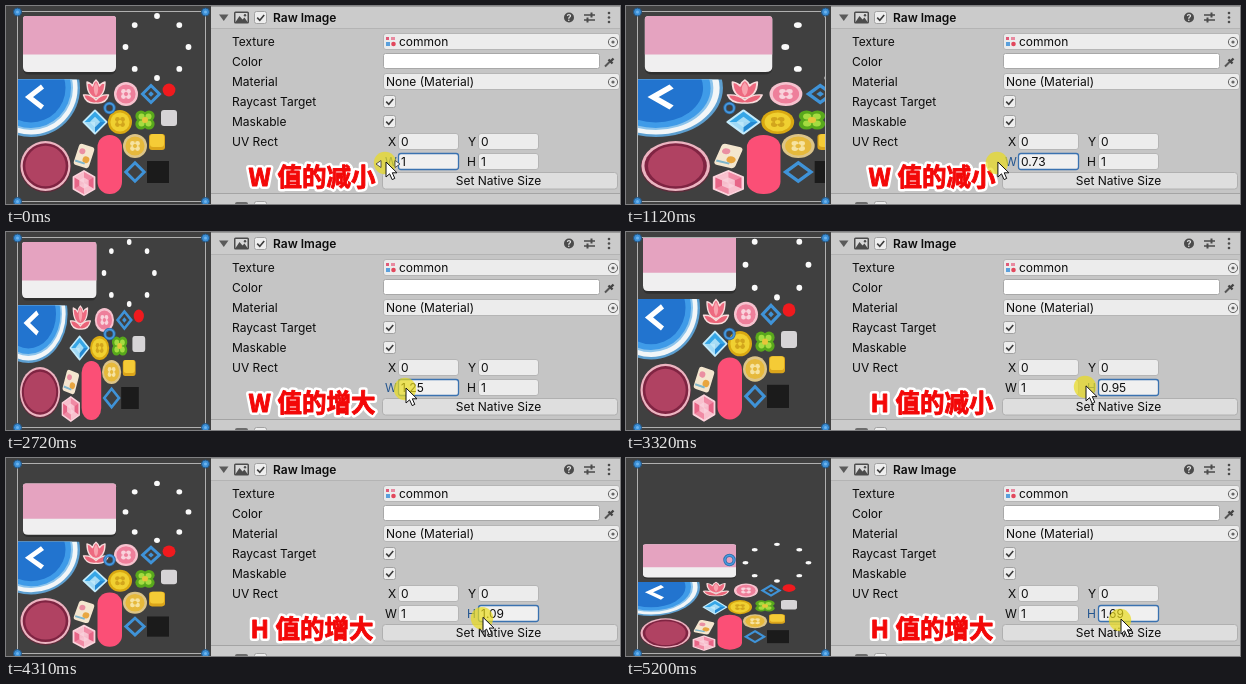
An HTML page that plays this animation: 614x198 px, repeating every 5.3 s.

```html
<!DOCTYPE html>
<html lang="zh">
<head>
<meta charset="utf-8">
<title>UV Rect</title>
<style>
html, body { margin: 0; width: 100%; height: 100%; overflow: hidden; background: #404040; }
svg { display: block; width: 614px; height: 198px; }
text { font: 12px Inter, "Open Sans", sans-serif; fill: #0c0c0c; white-space: pre; }
.title { font-weight: 600; }
.active { fill: #23558f; }
.box { fill: #ececec; stroke: #b5b5b5; }
.focus { fill: #f0f0f0; stroke: #3a72b0; stroke-width: 1.3; }
.caption {
  font: bold 24.5px "Noto Sans CJK SC", "Noto Sans CJK", "Noto Sans CJK JP", sans-serif;
  fill: #f30808; stroke: #f30808; stroke-width: .9px; stroke-linejoin: round;
  text-anchor: middle; word-spacing: 1px;
}
.outline { stroke: #fff; stroke-width: 6px; }
</style>
</head>
<body>
<svg id="stage" viewBox="0 0 614 198" xmlns="http://www.w3.org/2000/svg"></svg>
<script>
const stage = document.getElementById('stage');

const circle = (x, y, r, fill, extra = '') =>
  `<circle cx="${x}" cy="${y}" r="${r}" fill="${fill}" ${extra}/>`;
const rect = (x, y, w, h, fill, rx = 0, extra = '') =>
  `<rect x="${x}" y="${y}" width="${w}" height="${h}" rx="${rx}" fill="${fill}" ${extra}/>`;
const path = (d, fill, extra = '') => `<path d="${d}" fill="${fill}" ${extra}/>`;
const line = (d, color, width, extra = '') =>
  path(d, 'none', `stroke="${color}" stroke-width="${width}" ${extra}`);
const label = (x, y, str, extra = '') => `<text x="${x}" y="${y}" ${extra}>${str}</text>`;
const field = (x, y, w, id = '') =>
  `<rect class="box" id="${id}" x="${x + .5}" y="${y + .5}" width="${w - 1}" height="16" rx="2.5"/>`;

const check = (x, y) =>
  rect(x + .5, y + .5, 12, 12, '#eeeeee', 2, 'stroke="#a2a2a2"') +
  line(`M${x + 3.2} ${y + 6.6}l2.6 2.6l4.4 -5.2`, '#3c3c3c', 1.6);
const picker = y =>
  circle(607, y, 4.6, 'none', 'stroke="#666"') + circle(607, y, 1.6, '#666');
const diamond = (x, y, r) =>
  line(`M${x} ${y - r}L${x + r} ${y}L${x} ${y + r}L${x - r} ${y}Z`, '#3f93d8', 3);

function petals(x, y, n, spread, r, fill) {
  return Array.from({ length: n }, (_, i) => {
    const a = (i / n) * 2 * Math.PI + Math.PI / 4;
    return circle((x + spread * Math.cos(a)).toFixed(1), (y + spread * Math.sin(a)).toFixed(1), r, fill);
  }).join('');
}

function coin(x, y, edge, face, mark) {
  return circle(x, y, 12, edge) + circle(x, y, 9.6, face) +
    petals(x, y, 4, 3.6, 2.4, mark) + circle(x, y, 2, face);
}

function gem(x, y, r, sides, light, mid, dark) {
  const at = (i, k) => {
    const a = (i / sides) * 2 * Math.PI - Math.PI / 2;
    return `${(x + k * Math.cos(a)).toFixed(1)} ${(y + k * Math.sin(a)).toFixed(1)}`;
  };
  const ring = k => 'M' + Array.from({ length: sides }, (_, i) => at(i, k)).join('L') + 'Z';
  let out = path(ring(r), mid, `stroke="${light}" stroke-width="2" stroke-linejoin="round"`);
  for (let i = 0; i < sides; i++)
    out += path(`M${x} ${y}L${at(i, r - 1)}L${at(i + 1, r - 1)}Z`, [mid, dark, light][i % 3], 'opacity=".75"');
  return out + path(ring(r * .45), light, 'opacity=".8"');
}

function flower() {
  const edge = 'stroke="#f8dcdc" stroke-width="1.4" stroke-linejoin="round"';
  return path('M90 97q-10 1 -12.5 -8q7 -1 12.5 5q5.500 -6 12.500 -5q-2.500 9 -12.500 8Z', '#ea6478', edge) +
    path('M90 92q-9 -2 -9 -16q4 1 5.500 4q1 -4 3.500 -6q2.500 2 3.500 6q1.500 -3 5.500 -4q0 14 -9 16Z', '#ee6a80', edge) +
    path('M90 76q4.500 7 0 14q-4.500 -7 0 -14Z', '#f8a3ae');
}

function atlas() {
  let out = '';
  // banner
  out += path('M17 50V61q0 6 6 6H104q6 0 6 -6V50Z', '#2f2f2f', 'transform="translate(0 1.5)"') +
    path('M17 13q0 -3 3 -3H107q3 0 3 3V61q0 5 -5 5H22q-5 0 -5 -5Z', '#f0eff0') +
    path('M17 13q0 -3 3 -3H107q3 0 3 3V48.5H17Z', '#e5a3c0');
  // ring of dots
  for (let i = 0; i < 8; i++) {
    const a = i * Math.PI / 4;
    out += circle((151 + 31.5 * Math.cos(a)).toFixed(1), (41 + 31 * Math.sin(a)).toFixed(1), 2.9, '#fafafa');
  }
  // back button
  out += '<g clip-path="url(#corner)">' +
    circle(25, 82, 49, '#5d9fd0') + circle(25, 82, 46.6, '#f2f6f8') +
    circle(25, 82, 42, '#8cc4ec') + circle(25, 82, 40, '#3f9be8') +
    circle(25, 82, 34.5, '#2274cf') + '</g>' +
    line('M36.5 80.5L23 91L36.5 101.5', '#fff', 5);
  out += flower();
  out += coin(120, 88, '#f6c3cf', '#ee7f9b', '#f9d3dc');
  out += diamond(145, 88, 8.5) + rect(143, 86, 4, 4, '#3f93d8', 0, 'transform="rotate(45 145 88)"');
  out += circle(163, 84, 6.4, '#f01a1e');
  // gems, coins and tiles
  out += gem(89, 116, 11.5, 4, '#c4ebfb', '#36a6e6', '#1b7fcc');
  out += coin(114, 116, '#d9a912', '#f0d031', '#d2a51c');
  out += petals(139, 114, 4, 5.6, 5.6, '#58a81c') + petals(139, 114, 4, 5, 3, '#a4dc40') +
    circle(139, 114, 3, '#e6c63a');
  out += rect(155, 104, 16, 16, '#d6d4d6', 3);
  out += '<g transform="rotate(18 78 150)">' + rect(70, 139, 16, 22, '#f4e6cf', 3) +
    circle(75, 146, 3, '#ea8fa2') + circle(81, 153, 3.4, '#e8a640') +
    line('M71 157h10', '#7fb6cc', 2) + '</g>';
  out += rect(91.5, 129, 24.5, 59, '#fb4f76', 12);
  out += coin(129, 140, '#dcc488', '#e6b93c', '#f6e3a0');
  out += rect(143, 128, 16, 16, '#dba51b', 3) + rect(144, 128, 14, 13, '#f5cb36', 3);
  out += gem(78, 177, 12, 6, '#fbd3dc', '#f08aa4', '#e4587e');
  out += diamond(129, 166, 9.2) + rect(141, 155, 22, 22, '#1b1b1b');
  // round red button
  out += circle(39.5, 161, 25.5, '#5c2b3a') + circle(39.5, 160, 25, '#ecb4c1') +
    circle(39.5, 160, 22.8, '#7f2442') + circle(39.5, 160, 20.2, '#b04262');
  return out;
}

function scene() {
  let out = rect(0, 0, 206, 198, '#404040') +
    `<g clip-path="url(#view)"><g id="tex">${atlas()}</g></g>` +
    rect(11.5, 5.5, 188, 190, 'none', 0, 'stroke="#b0b0b0" stroke-width="1"');
  for (const x of [11.5, 199.5])
    for (const y of [6, 195.5])
      out += circle(x, y, 4, '#3c8fd6', 'stroke="#24527c" stroke-width="1"') + circle(x, y, 1.5, '#6db4ee');
  return out + circle(103.5, 102, 4.6, 'none', 'stroke="#2c6ca8" stroke-width="3.2"') +
    circle(103.5, 102, 4.6, 'none', 'stroke="#4a9be0" stroke-width="1.6"');
}

function header() {
  return rect(205, 0, 409, 22, '#cbcbcb') + rect(205, 0, 409, 1, '#9a9a9a') + rect(205, 22, 409, 1, '#b4b4b4') +
    path('M213 8.5h9.5l-4.75 6.5Z', '#5a5a5a') +
    rect(228, 5.5, 15, 12, '#4c4c4c', 1.5) + rect(229.5, 7, 12, 9, '#d8d8d8') +
    path('M229.5 16l4 -6l3 3.6l2 -2l3 4.4Z', '#4c4c4c') + circle(239, 9.3, 1.2, '#4c4c4c') +
    check(248, 5) + label(267, 16, 'Raw Image', 'class="title"') +
    circle(563, 11.5, 5, '#4b4b4b') +
    label(563, 14.7, '?', 'text-anchor="middle" style="font-size:9px;font-weight:700;fill:#e0e0e0"') +
    line('M578 9h11M578 14h11', '#4b4b4b', 1.3) + line('M585.5 6.5v5M581.5 11.5v5', '#4b4b4b', 2) +
    [7, 11.5, 16].map(y => circle(603, y, 1.3, '#4b4b4b')).join('');
}

function inspector() {
  const rows = [['Texture', 40], ['Color', 60], ['Material', 80], ['Raycast Target', 100], ['Maskable', 120], ['UV Rect', 140]];
  let out = rect(205, 0, 409, 198, '#c5c5c5') + header();
  out += rows.map(([s, y]) => label(226, y, s)).join('');
  out += field(377, 27, 237) + field(377, 67, 237) + picker(36) + picker(76);
  out += rect(380, 31, 3, 3, '#e05a78') + rect(385, 31, 4, 3, '#e88aa0') +
    rect(380, 36, 4, 4, '#5aa0dc') + circle(387.5, 38, 2.3, '#e2475c');
  out += label(393, 40, 'common') + label(380, 80, 'None (Material)');
  out += rect(377.5, 47.5, 216, 15, '#fff', 2, 'stroke="#a8a8a8"') +
    line('M599 60.5l5 -5', '#555', 2) + line('M602.5 53.5l4 4M605 55l2.5 -2.5', '#444', 2.4);
  out += check(377, 89) + check(377, 109);
  out += field(392, 127, 61) + field(472, 127, 61) + field(392, 147, 61, 'boxW') + field(472, 147, 61, 'boxH');
  out += label(382, 140, 'X') + label(462, 140, 'Y') + label(395, 140, '0') + label(475, 140, '0');
  out += label(379, 160, 'W', 'id="nameW"') + label(461, 160, 'H', 'id="nameH"') +
    label(395, 160, '', 'id="valW"') + label(475, 160, '', 'id="valH"');
  out += rect(376.5, 166.5, 235, 16.5, '#dedede', 3, 'stroke="#b0b0b0"') +
    label(492.5, 179, 'Set Native Size', 'text-anchor="middle"');
  // top edge of the next component
  out += rect(205, 187, 409, 1, '#a4a4a4') + rect(205, 188, 409, 10, '#cbcbcb') +
    rect(229, 196, 13, 4, '#6c6c6c', 2) + rect(248.5, 195.5, 12, 8, '#eeeeee', 2, 'stroke="#a2a2a2"');
  return out;
}

stage.innerHTML =
  `<defs><clipPath id="view">${rect(11.5, 5, 188, 191, '#000')}</clipPath>` +
  `<clipPath id="corner">${rect(11, 73.5, 80, 70, '#000')}</clipPath></defs>` +
  scene() + inspector() +
  label(306, 180, '', 'class="caption outline"') + label(306, 180, '', 'class="caption"') +
  '<g id="pointer">' + circle(-1, 0, 11.2, '#eadb1c', 'opacity=".7"') +
  path('M-10 -2.5l-5 3.5l5 3.5ZM4 -2.5l5 3.5l-5 3.5Z', '#f4f4f4', 'id="drag" stroke="#333" stroke-width=".8" transform="translate(5 0)"') +
  path('M0 -1V14L3.6 10.8L6.2 16.6L8.8 15.4L6.3 9.8H11Z', '#fff', 'stroke="#111" stroke-width="1" stroke-linejoin="round"') +
  '</g>';

// each part: dragged axis, caption, pointer home, then [time, value] steps
const parts = [
  { axis: 'W', text: 'W 值的减小', x: 380, y: 157, steps: [[0, 1], [200, .98], [300, .96], [400, .93], [500, .91], [600, .88],
    [700, .86], [820, .83], [920, .8], [1020, .76], [1120, .73], [1220, .69], [1320, .65], [1420, .62], [1620, .58], [1720, .55]], textEnd: 1620 },
  { axis: 'W', text: 'W 值的增大', x: 392.5, y: 157, steps: [[2020, 1], [2120, 1.01], [2220, 1.04], [2320, 1.08], [2420, 1.12],
    [2520, 1.17], [2620, 1.21], [2720, 1.25], [2820, 1.29], [2920, 1.32]] },
  { axis: 'H', text: 'H 值的减小', x: 461.5, y: 155, steps: [[3120, 1], [3220, .99], [3320, .95], [3420, .89], [3520, .82],
    [3620, .75], [3710, .69], [3810, .63]] },
  { axis: 'H', text: 'H 值的增大', x: 474.3, y: 160, steps: [[4000, 1], [4100, 1.02], [4200, 1.05], [4310, 1.09], [4400, 1.12],
    [4500, 1.15], [4600, 1.21], [4700, 1.27], [4800, 1.35], [4900, 1.43], [5000, 1.51], [5100, 1.6], [5200, 1.69]] }
];
const LOOP = 5300;
const el = id => document.getElementById(id);
const captions = document.querySelectorAll('.caption');

function draw(t) {
  const part = parts.filter(p => p.steps[0][0] <= t).pop();
  const value = part.steps.filter(s => s[0] <= t).pop()[1];
  const size = { W: 1, H: 1, [part.axis]: value };
  for (const k of ['W', 'H']) {
    const on = k === part.axis;
    el('val' + k).textContent = String(size[k]);
    el('box' + k).setAttribute('class', on ? 'focus' : 'box');
    el('name' + k).setAttribute('class', on ? 'active' : '');
  }
  el('tex').setAttribute('transform', `translate(12 197) scale(${1 / size.W} ${1 / size.H}) translate(-12 -197)`);
  for (const c of captions) c.textContent = t < (part.textEnd || LOOP) ? part.text : '';
  const drop = part.axis === 'H' ? 3 * (value - 1) : 0;
  el('pointer').setAttribute('transform', `translate(${part.x + 30 * (value - 1)} ${part.y + drop})`);
  el('drag').setAttribute('visibility', t < 200 ? 'visible' : 'hidden');
}

const start = performance.now();
function tick() {
  draw((performance.now() - start) % LOOP);
  requestAnimationFrame(tick);
}
draw(0);
requestAnimationFrame(tick);
</script>
</body>
</html>
```
